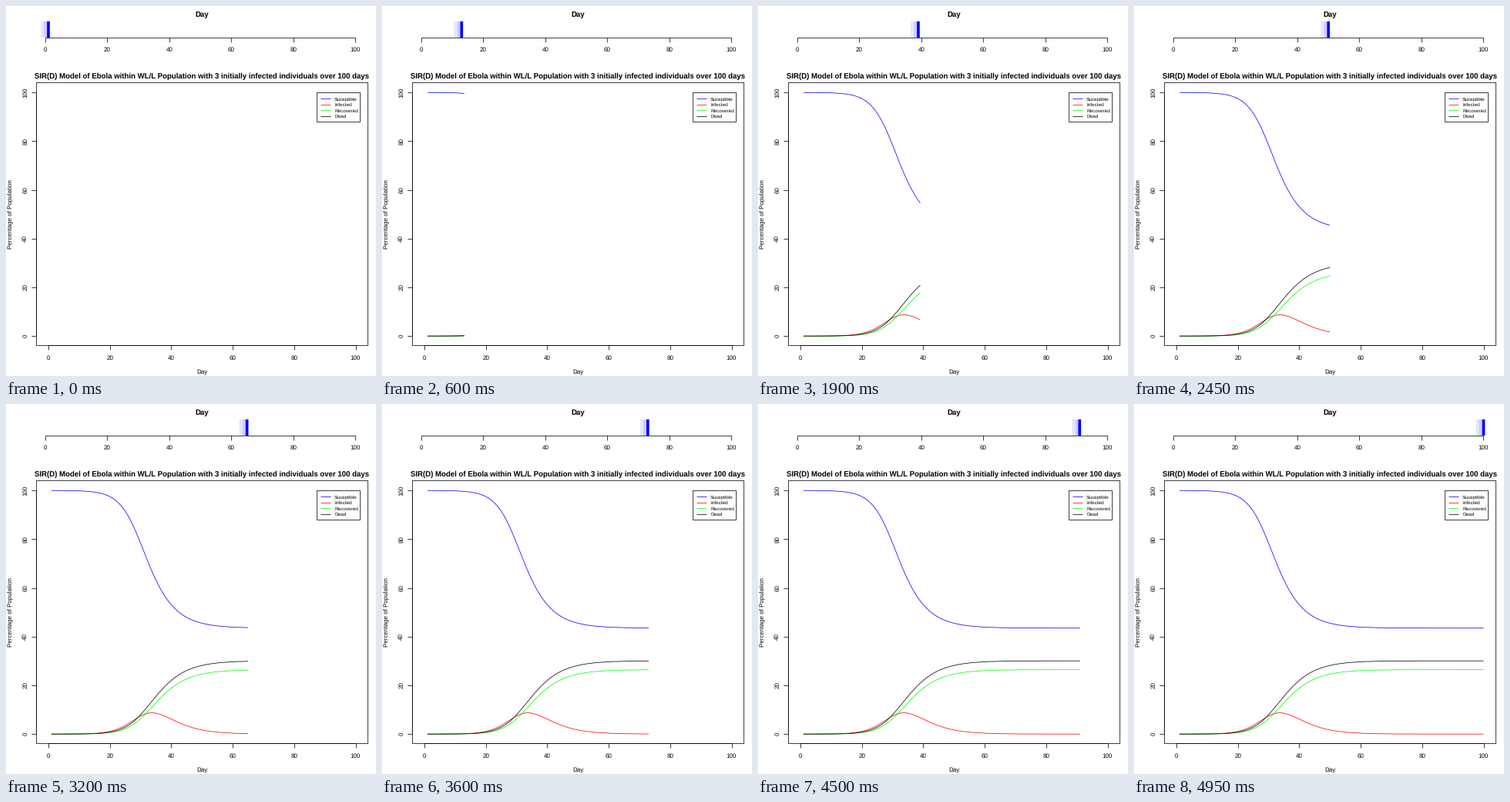
Recreate the animation shown at these times as a matplotlib script. Size 480 px wide and 480 px high, loop 5 s.

```python
import numpy as np
import matplotlib
import matplotlib.pyplot as plt
from matplotlib.animation import FuncAnimation
from matplotlib.patches import Rectangle

matplotlib.rcParams["font.family"] = "Liberation Sans"
matplotlib.rcParams["text.hinting"] = "none"

SIZE, DPI = 480, 72          # at 72 dpi one point is one pixel
DAYS, STEP_MS = 100, 50
THIN = 0.75
LEFT, TOP, RIGHT, BOTTOM = 39, 99, 469, 440
TICKS = range(0, 101, 20)

# Epidemic model: contacts fall with the square root of the susceptible share
REPRODUCTION, REMOVAL, SEED = 1.827, 0.335, 5.7e-5
DEATH_SHARE, LAG = 0.532, 0.3   # deaths come slightly before recoveries


def susceptible_share(removed):
    return (1 + 0.5 * REPRODUCTION * removed) ** -2


def infected_share(removed):
    return 1 - susceptible_share(removed) - removed


def simulate(dt=0.05):
    """Removed share over time, by the midpoint rule."""
    times = np.arange(0, DAYS + 1, dt)
    removed = [SEED]
    for _ in times[1:]:
        r = removed[-1]
        half = r + REMOVAL * infected_share(r) * dt / 2
        removed.append(r + REMOVAL * infected_share(half) * dt)
    return times, np.array(removed)


times, removed = simulate()
day = np.arange(1, DAYS + 1)
gone = np.interp(day, times, removed)
susceptible = 100 * susceptible_share(gone)
infected = 100 * infected_share(gone)
dead = 100 * DEATH_SHARE * np.interp(day + LAG, times, removed)
recovered = 100 * (1 - DEATH_SHARE) * np.interp(day - LAG, times, removed)


def px(d):
    return 55 + 3.985 * d


def py(percent):
    return 428.2 - 3.16 * percent


def bar_px(d):
    return 50.97 + 4.025 * d


fig = plt.figure(figsize=(SIZE / DPI, SIZE / DPI), dpi=DPI, facecolor="white")
ax = fig.add_axes([0, 0, 1, 1])
ax.set_xlim(0, SIZE)
ax.set_ylim(SIZE, 0)
ax.axis("off")


def line(xs, ys, color="black", z=3):
    return ax.plot(xs, ys, color=color, lw=THIN, zorder=z,
                   solid_capstyle="butt")[0]


def label(x, y, text, size=8, **kw):
    kw.setdefault("ha", "center")
    ax.text(x, y, text, fontsize=size, va="baseline",
            rotation_mode="anchor", zorder=5, **kw)


def frame_box(x0, y0, x1, y1):
    ax.add_patch(Rectangle((x0, y0), x1 - x0, y1 - y0, fc="none", ec="black",
                           lw=THIN, zorder=3))


def x_axis(to_px, y, text_y):
    line([to_px(0), to_px(100)], [y, y])
    for v in TICKS:
        line([to_px(v)] * 2, [y, y + 6])
        label(to_px(v), text_y, str(v))


# Day strip
label(254.3, 14.3, "Day", 9.6, weight="bold")
x_axis(bar_px, 41, 59)

# Main plot
label(254.3, 94.2, "SIR(D) Model of Ebola within WL/L Population with 3 initially "
      "infected individuals over 100 days", 9.6, weight="bold")
frame_box(LEFT, TOP, RIGHT, BOTTOM)
x_axis(px, BOTTOM, 458.7)
line([LEFT, LEFT], [py(0), py(100)])
for v in TICKS:
    line([LEFT - 6, LEFT], [py(v)] * 2)
    label(27.2, py(v), str(v), rotation=90)
label(254.3, 477.5, "Day")
label(8.4, 270.3, "Percentage of Population", rotation=90)

# Legend and the curves it names
frame_box(403, 112, 459, 150)
series = [("Suceptible", "#0000ff", susceptible), ("Infected", "#ff0000", infected),
          ("Recovered", "#00ff00", recovered), ("Dead", "#000000", dead)]
curves = []
for i, (name, color, _) in enumerate(series):
    y = 120 + 7.6 * i
    line([408, 420.5], [y, y], color)
    label(426, y + 2.5, name, 6.4, ha="left")
    curves.append(line([], [], color, z=2))

# Today's bar with two fading days behind it
BAR_W = 5 * THIN
bars = [ax.add_patch(Rectangle((0, 20), BAR_W, 21, fc="blue", ec="none",
                               alpha=a / 255, zorder=2, snap=False))
        for a in (255, 50, 25)]


def draw(i):
    today = i + 1
    for back, bar in enumerate(bars):
        bar.set_x(bar_px(today - back) - BAR_W / 2)
    for curve, (_, _, values) in zip(curves, series):
        curve.set_data(px(day[:today]), py(values[:today]))
    return bars + curves


anim = FuncAnimation(fig, draw, frames=DAYS, interval=STEP_MS, repeat=True,
                     repeat_delay=0, blit=False)
plt.show()
```
